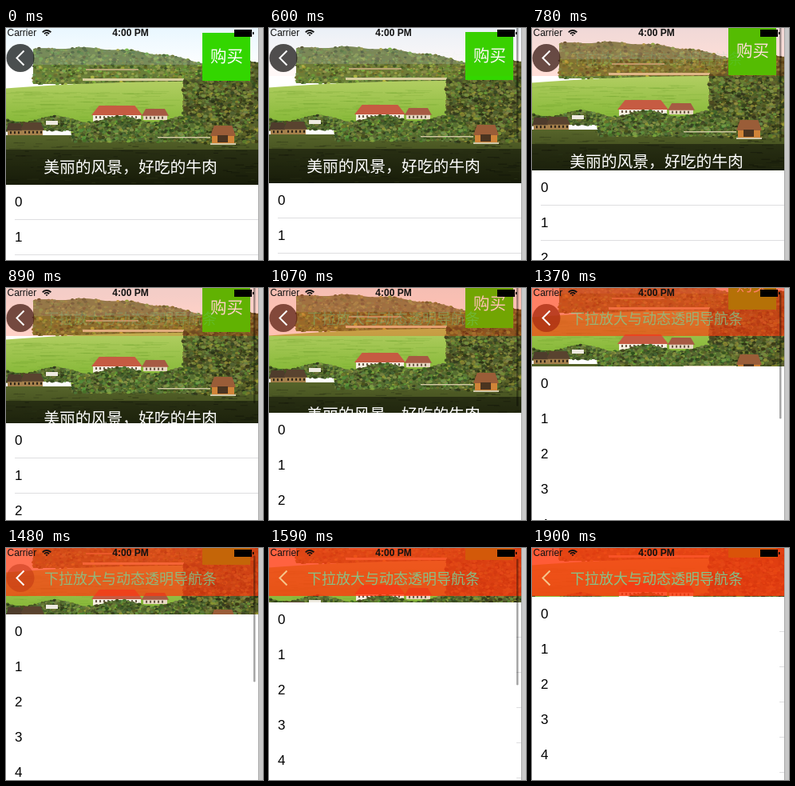
Animation of 322x290 px, one loop 1.97 s. Source, as an HTML page with a canvas:

```html
<!DOCTYPE html>
<html lang="zh">
<head>
<meta charset="utf-8">
<style>
html, body { margin: 0; width: 100%; height: 100%; overflow: hidden; background: #fff; }
canvas { display: block; }
</style>
</head>
<body>
<canvas id="stage" width="322" height="290"></canvas>
<script>
const W = 316, H = 290, PHOTO = 196, ROW = 44, NAV = 60;
const LOOP = 1970, REST = 600, STEP = 58.2, MAX = 135;
const CJK = '"Noto Sans CJK SC", "Noto Sans CJK", sans-serif';
const THIN = '"Noto Sans CJK SC Light", ' + CJK;
const LATIN = '"Liberation Sans", Arial, sans-serif';
const ctx = document.getElementById('stage').getContext('2d');

// Drag: [step, scroll offset], linear in between
const drag = [[0, 2.4], [3, 18.4], [8, 40], [13, 98], [17, 128], [18, MAX]];

function offset(step) {
  if (step < 0) return 0;
  const i = drag.findIndex(key => key[0] > step);
  if (i < 0) return MAX;
  const [[k0, s0], [k1, s1]] = [drag[i - 1], drag[i]];
  return s0 + (s1 - s0) * (step - k0) / (k1 - k0);
}

let seed = 7;
function rnd(a, b) {
  seed = (seed * 16807) % 2147483647;
  return a + (b - a) * seed / 2147483647;
}

function rect(c, color, x, y, w, h) {
  c.fillStyle = color;
  c.fillRect(x, y, w, h);
}

function fade(c, top, bottom, from, to) {
  const g = c.createLinearGradient(0, top, 0, bottom);
  g.addColorStop(0, from);
  g.addColorStop(1, to);
  return g;
}

// Land whose upper edge follows top(x)
function land(c, color, x0, x1, top, bottom) {
  for (let x = x0; x < x1; x++) rect(c, color, x, top(x), 1, bottom - top(x));
}

// Leaves scattered below top(x), lit more towards the top of each clump
function grove(c, x0, x1, top, bottom, hue, light, size, count) {
  land(c, `hsl(${hue} 38% ${light}%)`, x0, x1, top, bottom);
  for (let i = 0; i < count; i++) {
    const x = rnd(x0, x1), y = rnd(top(x), bottom), r = size * rnd(.5, 1.3);
    c.fillStyle = `hsl(${hue + rnd(-18, 18)} ${rnd(30, 50)}% ${light + rnd(-13, 14)}%)`;
    c.beginPath();
    c.ellipse(x, y, r, r * .75, 0, 0, 7);
    c.fill();
  }
}

function house(c, x, y, w, h, roof, wall, trim) {
  const eave = y + h * .55;
  rect(c, wall, x + 2, eave, w - 4, h * .45);
  for (let i = x + 5; i < x + w - 4; i += 5) rect(c, trim, i, eave + 2, 2, 3);
  c.fillStyle = roof;
  c.beginPath();
  c.moveTo(x, eave + 1);
  c.lineTo(x + w * .15, y);
  c.lineTo(x + w * .85, y);
  c.lineTo(x + w, eave + 1);
  c.fill();
}

function paintPhoto() {
  const photo = document.createElement('canvas');
  photo.width = W;
  photo.height = PHOTO;
  const c = photo.getContext('2d');
  const ridge = x => 25 + (x - 85) ** 2 / 1400 + Math.sin(x / 9);
  const meadow = x => 67 + (225 - x) ** 2 / 6000;
  const shrubs = x => 114 + 4 * Math.sin(x / 13);
  const woods = x => 64 - (x - 220) * .25 + 3 * Math.sin(x / 7);

  rect(c, fade(c, 0, 50, '#e9f7ff', '#fff'), 0, 0, W, PHOTO);
  grove(c, 34, W, ridge, 70, 78, 36, 2, 1300);
  land(c, 'rgba(150,170,170,.3)', 34, W, ridge, 46);
  rect(c, '#b9a877', 100, 51, 66, 2);
  rect(c, '#d9cf9f', 96, 63, 127, 3);

  land(c, fade(c, 67, 120, '#b2ce62', '#86b838'), 0, 240, meadow, 125);
  for (let i = 0; i < 120; i++) {
    rect(c, 'rgba(95,150,35,.18)', rnd(0, 200), rnd(77, 114), rnd(8, 32), 1);
  }

  rect(c, fade(c, 134, PHOTO, '#56642a', '#2b3310'), 0, 134, W, PHOTO - 134);
  for (let i = 0; i < 200; i++) {
    rect(c, `hsl(75 40% ${rnd(8, 28)}% / .6)`, rnd(0, W), rnd(136, 194), rnd(3, 16), 1);
  }

  grove(c, 222, W, woods, 144, 72, 27, 2.3, 1500);
  grove(c, 0, 90, shrubs, 128, 82, 28, 2.2, 300);
  house(c, 107, 97, 64, 20, '#c65b42', '#f5eee0', '#6b5a48');
  house(c, 170, 101, 34, 14, '#a65a43', '#e8d8c2', '#6b5a48');
  grove(c, 82, 250, shrubs, 142, 82, 31, 2.2, 1000);

  rect(c, '#d1c8a2', 190, 136, 66, 1.5);
  house(c, 0, 119, 22, 15, '#4e3c2c', '#a5804c', '#2d2318');
  house(c, 18, 118, 30, 16, '#59432f', '#a5804c', '#2d2318');
  rect(c, '#eeeae0', 50, 116, 15, 5);
  house(c, 256, 122, 32, 22, '#9a5d38', '#d08438', '#d08438');
  rect(c, '#4a3420', 265, 134, 13, 9);
  rect(c, '#cfc7a8', 256, 144, 32, 2);

  rect(c, 'rgba(0,0,0,.45)', 0, 152, W, 44);
  return photo;
}

const photo = paintPhoto();

function text(str, x, y, font, color, align = 'left') {
  ctx.font = font;
  ctx.fillStyle = color;
  ctx.textAlign = align;
  ctx.fillText(str, x, y);
}

function header(s, bottom) {
  const shift = -.4 * s, tint = .82 * (s / MAX) ** .8;
  ctx.save();
  ctx.beginPath();
  ctx.rect(0, 0, W, bottom);
  ctx.clip();
  ctx.drawImage(photo, 0, Math.round(shift));
  text('美丽的风景，好吃的牛肉', 156, 181 + shift, '300 19.8px ' + THIN, '#fff', 'center');
  rect(ctx, '#33d600', 246, Math.round(6 + shift), 60, 60);
  text('购买', 276.5, 43 + shift, '300 20.5px ' + THIN, '#fff', 'center');

  const disc = .78 * Math.max(0, Math.min(1, (125 - s) / 20));
  ctx.fillStyle = `rgba(25,30,30,${disc})`;
  ctx.beginPath();
  ctx.arc(18, 37.5, 17.5, 0, 7);
  ctx.fill();
  rect(ctx, `rgba(255,56,12,${tint})`, 0, 0, W, NAV);

  ctx.globalAlpha = tint;
  text('下拉放大与动态透明导航条', 156, 44.5, '18px ' + CJK, '#70dca2', 'center');
  ctx.restore();

  ctx.strokeStyle = s > 115 ? '#f6c48a' : '#fff';
  ctx.lineWidth = 2;
  ctx.beginPath();
  ctx.moveTo(22.5, 28.5);
  ctx.lineTo(13.5, 37.5);
  ctx.lineTo(22.5, 46.5);
  ctx.stroke();
}

function statusBar() {
  text('Carrier', 1.5, 10, '12px ' + LATIN, '#111');
  text('4:00 PM', 156, 10, 'bold 12px ' + LATIN, '#111', 'center');
  ctx.strokeStyle = '#111';
  ctx.lineWidth = 1.8;
  for (const r of [1, 4, 7]) {
    ctx.beginPath();
    ctx.arc(51, 10, r, -Math.PI * .77, -Math.PI * .23);
    ctx.stroke();
  }
  rect(ctx, '#000', 286, 2, 22, 9);
  rect(ctx, '#000', 309, 5, 1.5, 3);
}

function list(s, bottom) {
  rect(ctx, '#fff', 0, bottom, W, H - bottom);
  const lineX = s < 30 ? 11 : s < 125 ? W : 310;
  for (let i = 0, y = bottom; y < H; i++, y += ROW) {
    text(String(i), 11, y + 27, '17px ' + LATIN, '#000');
    rect(ctx, '#dedee0', lineX, y + ROW - 1, W - lineX, 1);
  }
}

function scrollBar(time, s) {
  const alpha = time < REST ? 0 : Math.max(0, Math.min(1, (1900 - time) / 200));
  ctx.fillStyle = `rgba(0,0,0,${.35 * alpha})`;
  ctx.beginPath();
  ctx.roundRect(310, .27 * s - 21, 2.5, 158, 1.25);
  ctx.fill();
}

function draw(now) {
  const time = now % LOOP;
  const s = offset(Math.floor((time - REST) / STEP));
  const bottom = Math.round(PHOTO - s);
  list(s, bottom);
  header(s, bottom);
  statusBar();
  scrollBar(time, s);
  rect(ctx, '#c8c8c8', W, 0, 6, H);
  rect(ctx, '#a8a8a8', W, 0, 1, H);
}

const start = performance.now();
function tick() {
  draw(performance.now() - start);
  requestAnimationFrame(tick);
}
tick();
</script>
</body>
</html>
```
